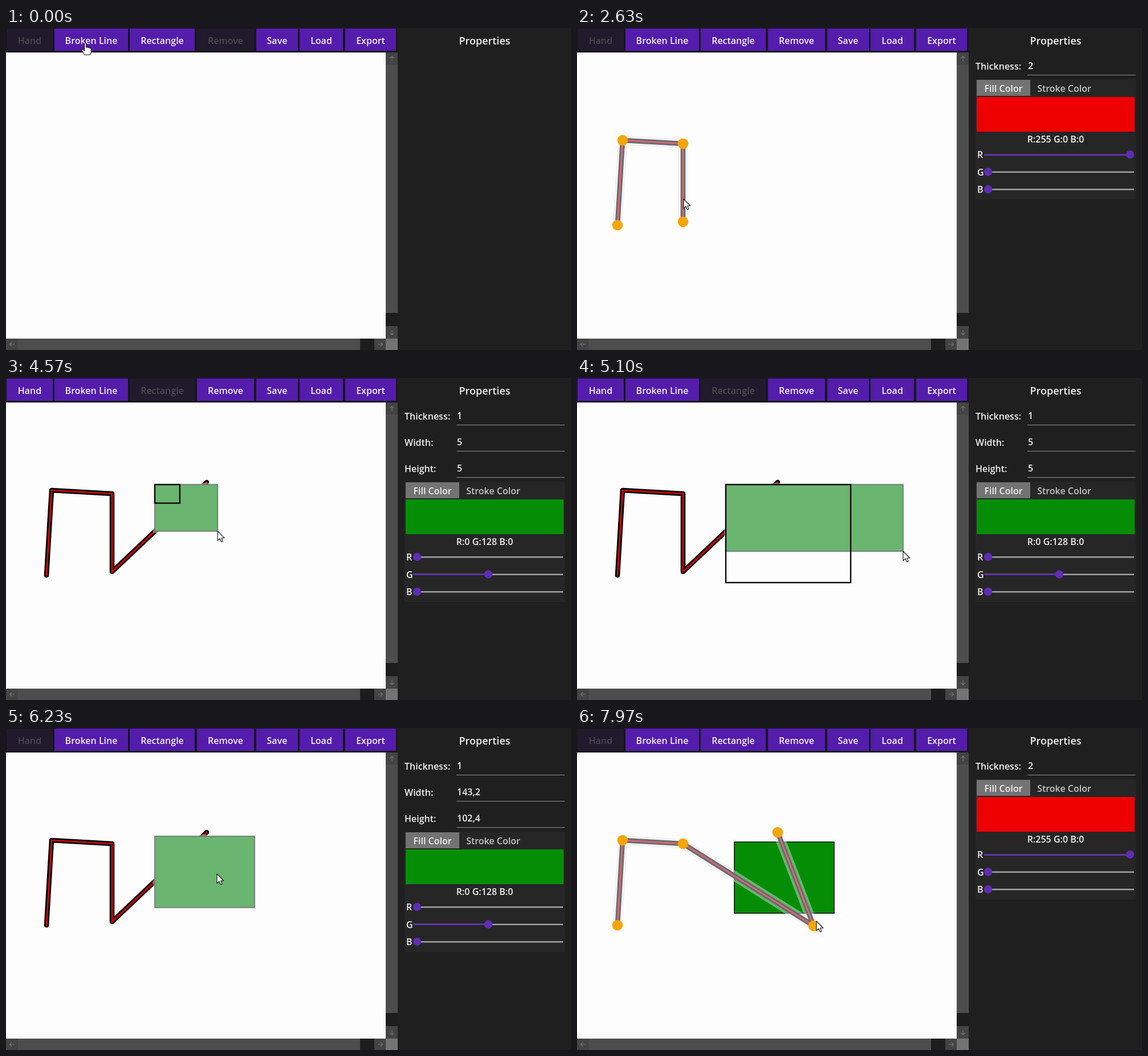
An HTML page with a canvas that plays this animation: 991 px wide and 565 px high, repeating every 8 s.

```html
<!DOCTYPE html>
<html lang="en">
<head>
<meta charset="utf-8">
<title>Vector editor</title>
<style>
  html, body { margin: 0; width: 100%; height: 100%; overflow: hidden; background: #1f1f1f; }
  canvas { display: block; }
</style>
</head>
<body>
<canvas id="stage" width="991" height="565"></canvas>
<script>
const ctx = document.getElementById('stage').getContext('2d');
const LOOP = 8000;
const FAMILY = '"Open Sans", "Noto Sans", sans-serif';
const PURPLE = '#541cab', ACCENT = '#5f2db4', GREEN = '#058e05', RED = '#ee0000';
const VEIL = 'rgba(228,228,240,.45)';

// label, left, right
const BUTTONS = [
  ['Hand', 1, 82], ['Broken Line', 85, 214], ['Rectangle', 217, 331], ['Remove', 335, 435],
  ['Save', 439, 512], ['Load', 515, 591], ['Export', 595, 684]
];

// time, x, y of the pointer
const POINTER = [
  [0, 139, 26], [120, 139, 26], [650, 71, 346], [830, 71, 346], [1050, 80, 197],
  [1120, 80, 197], [1290, 186, 203], [1340, 186, 203], [1530, 184, 325], [1640, 186, 340],
  [1740, 186, 340], [2050, 41, 22], [2120, 41, 22], [2480, 187, 300], [2640, 187, 300],
  [2760, 186, 340], [2810, 186, 340], [3120, 352, 183], [3170, 352, 183], [3290, 375, 350],
  [3340, 375, 350], [3640, 275, 24], [3700, 275, 24], [3970, 347, 302], [4270, 261, 187],
  [4350, 261, 187], [4700, 420, 305], [5000, 480, 359], [5100, 572, 304], [5250, 500, 335],
  [5400, 436, 312], [5460, 436, 312], [5710, 41, 22], [5790, 41, 22], [6050, 370, 253],
  [6180, 370, 253], [6230, 370, 256], [6480, 385, 266], [6550, 385, 266], [6850, 230, 297],
  [6930, 230, 297], [7250, 191, 332], [7430, 191, 332], [7970, 420, 339], [8000, 420, 339]
];

// start time, value
const TOOLS = [[0, 'Hand'], [120, 'Broken Line'], [2080, 'Hand'], [3670, 'Rectangle'], [5760, 'Hand']];
const SELECTION = [[0, ''], [700, 'line'], [2080, ''], [2480, 'line'], [3310, ''],
  [4350, 'rect'], [5760, ''], [6080, 'rect'], [6900, 'line']];

const valueAt = (steps, t) => steps.filter(s => s[0] <= t).pop()[1];

function pointerAt(t) {
  const i = Math.max(1, POINTER.findIndex(p => p[0] > t));
  const [t0, x0, y0] = POINTER[i - 1], [t1, x1, y1] = POINTER[i];
  const u = (t - t0) / (t1 - t0), k = u * u * (3 - 2 * u);
  return [x0 + (x1 - x0) * k, y0 + (y1 - y0) * k];
}

function linePoints(t) {
  if (t < 700) return [];
  const tip = pointerAt(t), points = [[71, 346]];
  points.push(t < 1090 ? tip : [80, 197]);
  if (t >= 1090) points.push(t < 1310 ? tip : [186, 203]);
  if (t >= 1310) {
    if (t < 1700) points.push(tip);
    else points.push(t < 7430 ? [186, 340] : [tip[0] - 5, tip[1] + 8]);
  }
  if (t >= 2800) points.push(t < 3150 ? tip : [352, 183]);
  return points;
}

function rectAt(t) {
  const [right, bottom] = t < 5400 ? pointerAt(Math.max(t, 4350)) : [436, 312];
  let dx = 0, dy = 0;
  if (t > 6180) {
    const p = pointerAt(Math.min(t, 6500));
    dx = p[0] - 370;
    dy = p[1] - 253;
  }
  return [261 + dx, 187 + dy, Math.max(6, right - 261), Math.max(6, bottom - 187)];
}

function box(x, y, right, bottom, color) {
  ctx.fillStyle = color;
  ctx.fillRect(x, y, right - x, bottom - y);
}

function disc(x, y, r, color) {
  ctx.fillStyle = color;
  ctx.beginPath();
  ctx.arc(x, y, r, 0, 7);
  ctx.fill();
}

function text(str, x, y, { color = '#f0f0f0', size = 16, align = 'left' } = {}) {
  ctx.font = `600 ${size}px ${FAMILY}`;
  ctx.textAlign = align;
  ctx.fillStyle = color;
  ctx.fillText(str, x, y);
}

function trace(points) {
  ctx.beginPath();
  points.forEach(p => ctx.lineTo(...p));
}

function stroke(width, color) {
  ctx.lineWidth = width;
  ctx.strokeStyle = color;
  ctx.stroke();
}

function drawLine(t, selected) {
  const points = linePoints(t);
  if (!points.length) return;
  ctx.lineCap = ctx.lineJoin = 'round';
  trace(points);
  stroke(8.6, '#050505');
  stroke(2.6, '#dc0606');
  if (!selected) return;
  ctx.lineCap = 'butt';
  ctx.lineJoin = 'miter';
  stroke(17, VEIL);
  points.forEach(p => disc(...p, 9.3, '#f5a504'));
}

function drawRect(t, selected) {
  if (t < 4350) return;
  const [x, y, w, h] = rectAt(t);
  ctx.fillStyle = GREEN;
  ctx.fillRect(x, y, w, h);
  ctx.lineJoin = 'miter';
  ctx.lineWidth = 1.6;
  ctx.strokeStyle = '#081808';
  ctx.strokeRect(x, y, w, h);
  if (!selected) return;
  ctx.fillStyle = VEIL;
  ctx.fillRect(x - 3, y - 3, w + 6, h + 6);
  if (t < 5440) {
    // the rubber band trails the shape while it is being sized
    ctx.lineWidth = 2.4;
    ctx.strokeStyle = '#080808';
    ctx.strokeRect(...rectAt(t - 100));
  }
}

function drawToolbar(tool, selected) {
  box(0, 0, 687, 43, '#1d1b22');
  for (const [label, left, right] of BUTTONS) {
    const off = label === tool || (label === 'Remove' && !selected);
    box(left - 1, 0, right + 2, 42, '#17131d');
    box(left, 1, right, 40, off ? '#211a2c' : PURPLE);
    text(label, (left + right) / 2, 28, { align: 'center', color: off ? '#4b484f' : '#f2f0f6' });
  }
}

function scrollArrow(x, y, angle) {
  ctx.save();
  ctx.translate(x, y);
  ctx.rotate(angle);
  ctx.lineCap = 'butt';
  ctx.lineJoin = 'miter';
  ctx.beginPath();
  ctx.moveTo(-4, 0); ctx.lineTo(4, 0);
  ctx.moveTo(1, -3.5); ctx.lineTo(4.5, 0); ctx.lineTo(1, 3.5);
  stroke(1.2, '#737373');
  ctx.restore();
}

function drawScrollbars() {
  box(666, 43, 687, 545, '#444444');
  box(666, 64, 687, 500, '#4d4d4d');
  box(666, 500, 687, 523, '#1d1d1d');
  box(0, 545, 666, 565, '#444444');
  box(21, 545, 621, 565, '#4d4d4d');
  box(621, 545, 646, 565, '#1d1d1d');
  box(666, 545, 687, 565, '#737373');
  scrollArrow(677, 54, -Math.PI / 2);
  scrollArrow(677, 534, Math.PI / 2);
  scrollArrow(11, 555, Math.PI);
  scrollArrow(656, 555, 0);
}

function field(label, value, y) {
  text(label, 699, y);
  text(value, 791, y - 1);
  box(790, y + 9, 980, y + 10, '#909090');
}

function slider(label, value, y) {
  const x = 721 + value / 255 * 249;
  text(label, 702, y + 6);
  box(714, y - 1, 977, y + 1.5, '#a2a2a2');
  if (value) box(714, y - 1, x, y + 1.5, ACCENT);
  disc(x, y, 7.2, ACCENT);
}

function drawPanel(t, selected) {
  box(687, 0, 991, 565, '#1f1f20');
  text('Properties', 839.5, 29, { size: 18, align: 'center' });
  if (!selected) return;
  const isRect = selected === 'rect', dy = isRect ? 92 : 0;
  const rgb = isRect ? [0, 128, 0] : [255, 0, 0];
  field('Thickness:', isRect ? '1' : '2', 73);
  if (isRect) {
    const sized = t >= 5760;
    field('Width:', sized ? '143,2' : '5', 119);
    field('Height:', sized ? '102,4' : '5', 165);
  }
  box(699, 90 + dy, 980, 301 + dy, '#262626');
  box(701, 91 + dy, 795, 119 + dy, '#737373');
  text('Fill Color', 748, 112 + dy, { align: 'center' });
  text('Stroke Color', 854.5, 112 + dy, { align: 'center', color: '#c6c6c6' });
  box(701, 121 + dy, 978, 182 + dy, isRect ? GREEN : RED);
  text(`R:${rgb[0]} G:${rgb[1]} B:${rgb[2]}`, 839.5, 201 + dy, { align: 'center' });
  ['R', 'G', 'B'].forEach((name, i) => slider(name, rgb[i], 222 + dy + i * 30.5));
}

const ARROW = new Path2D('M0 0V16.5L4 13L6.6 18.8L9.2 17.6L6.7 12H11.8Z');
const HAND = new Path2D('M-1.5 1.5Q0 -1 1.5 1.5V8Q4 6.5 5 8.5Q7.5 7.5 8 9.5Q10.5 9 10.5 11.5V15' +
  'Q10 18 8.5 21H-1.5Q-3 17.5 -6 14Q-7 11 -4 11.5L-1.5 14Z');

function drawPointer(t) {
  const [x, y] = pointerAt(t);
  const shape = y < 41 ? HAND : ARROW;
  ctx.save();
  ctx.translate(x, y);
  ctx.lineJoin = 'round';
  ctx.fillStyle = '#fff';
  ctx.fill(shape);
  ctx.lineWidth = 1.1;
  ctx.strokeStyle = '#101010';
  ctx.stroke(shape);
  ctx.restore();
}

function draw(t) {
  const selected = valueAt(SELECTION, t);
  box(0, 0, 667, 545, '#fdfdfd');
  ctx.save();
  ctx.beginPath();
  ctx.rect(0, 43, 666, 502);
  ctx.clip();
  const layers = [() => drawLine(t, selected === 'line'), () => drawRect(t, selected === 'rect')];
  if (selected === 'line') layers.reverse();
  layers.forEach(layer => layer());
  ctx.restore();
  drawToolbar(valueAt(TOOLS, t), selected);
  drawScrollbars();
  drawPanel(t, selected);
  drawPointer(t);
}

const start = performance.now();
function tick() {
  draw((performance.now() - start) % LOOP);
  requestAnimationFrame(tick);
}
tick();
</script>
</body>
</html>
```
